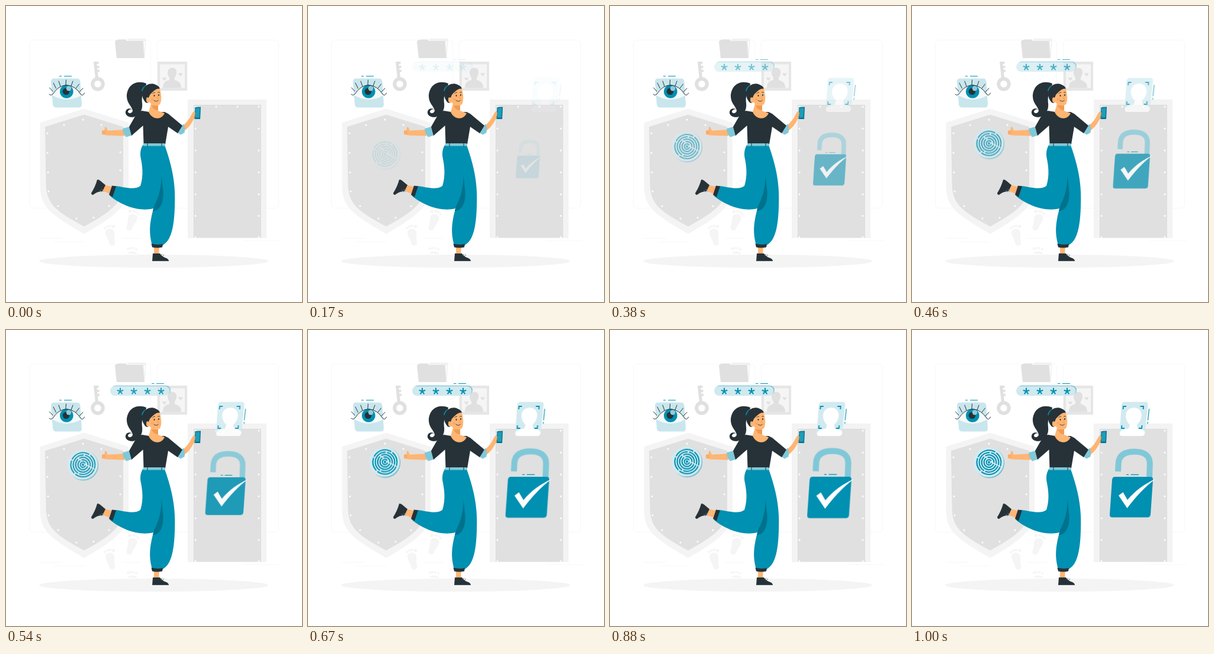
An HTML page without scripts for the animation above (1040 ms loop, 500 px wide and 500 px high).

```html
<!DOCTYPE html>
<html lang="en">
<head>
<meta charset="utf-8">
<title>Secure sign-in</title>
<style>
  html, body { margin: 0; width: 100%; height: 100%; overflow: hidden; background: #fff; }
  svg { display: block; width: 100%; height: 100%; }
  .line { fill: none; stroke: #263238; stroke-linecap: round; stroke-linejoin: round; }
  .tick { fill: none; stroke: #0090b1; stroke-width: 1.2; stroke-linecap: round; }
  .rivet { fill: none; stroke: #fff; stroke-width: 3; stroke-linecap: round; }
  .show { --from: none; animation: show 1040ms infinite cubic-bezier(.36, -.01, .5, 1.38); }
  .left { --from: translateX(30px); }
  .up { --from: translateY(30px); }
  .zoom { --from: scale(.5); transform-origin: 372.5px 258.5px; }
  @keyframes show {
    0% { opacity: 0; transform: var(--from) }
    91.4%, 100% { opacity: 1; transform: none }
  }
</style>
</head>
<body>
<svg viewBox="0 0 500 500">
  <defs>
    <path id="star" d="M0 0V-5.700M0 0 5.200-1.700M0 0-5.200-1.700M0 0 3.300 4.600M0 0-3.300 4.600" fill="none" stroke="#0090b1" stroke-width="2.100"/>
    <path id="heart" d="M0 3C-5-1-3-3-1.5-2.5L0-1 1.5-2.5C3-3 5-1 0 3Z" fill="#e0e0e0"/>
    <g id="foot" fill="#f5f5f5">
      <path d="M-9-6C-9-13 5-14 6-6 7 0 5 4 7 10 9 18-1 19-3 12-4 5-9 1-9-6Z"/>
      <circle cx="-10" cy="-13" r="2"/><circle cx="-6" cy="-15.5" r="2"/>
      <circle cx="-1.500" cy="-16.500" r="2.200"/><circle cx="4.500" cy="-15.500" r="2.800"/>
    </g>
  </defs>

  <!-- room -->
  <g fill="none" stroke="#f7f7f7">
    <rect x="39.500" y="57.500" width="205" height="284" rx="6"/>
    <rect x="255.500" y="57.500" width="205" height="284" rx="6"/>
    <path d="M57 392.500H95M82 398.500H131M402 396.500H463M195 392.500H228"/>
  </g>
  <ellipse cx="249.500" cy="431" rx="193.500" ry="11" fill="#f4f4f4"/>

  <path d="M205 55H236L233 88H210Z" fill="#f2f2f2"/>
  <path d="M232 59 236 58 233.500 88Z" fill="#fff" stroke="#ebebeb"/>
  <path d="M184 60Q186 56.500 191 56.500H202L204 59H231L233.500 88H187Z" fill="#e0e0e0"/>

  <g fill="none" stroke="#e0e0e0">
    <circle cx="155" cy="131.800" r="8.800" stroke-width="6"/>
    <path d="M150.500 94 153.500 122" stroke-width="5"/>
    <path d="M151 96.300 156.500 95.700M151.500 103.300 157.500 102.700M152 110 158 109.400" stroke-width="3.800"/>
  </g>

  <path d="M256 94H306V143H256Z" fill="#e6e6e6"/>
  <path d="M260 98.500H302V138.500H260Z" fill="#f5f5f5"/>
  <path d="M265 138.500C265 129 269 127 276 125V121C270 112 274 104.500 281 104.500S291 112 285 121V125C292 127 296 130 296 138.500Z" fill="#e0e0e0"/>
  <use href="#heart" x="267.500" y="123"/><use href="#heart" x="295" y="115.500"/>

  <path d="M57.500 197 132 173.500 207 197V304C207 335 190 352 132 385 75 352 58 340 57.500 304Z" fill="#f4f4f4"/>
  <path d="M66 204 132 183.500 198 204V300C198 329 184 344 132 372.500 84 346 68 335 67.500 300Z" fill="#e0e0e0"/>
  <path class="rivet" d="M70 215h0M70 248h0M71 281h0M72 313h0M88 338h0M119 359h0M148 357.500h0M174 338h0M192 313h0M193 277.500h0M193 247h0M193 215h0M130 192h0M161 201h0M98 201h0"/>

  <path d="M307 158H440V392H307Z" fill="#f3f3f3"/>
  <path d="M317 167H431V391.500H317Z" fill="#e0e0e0"/>
  <path d="M317.500 391V167.500H431" fill="none" stroke="#d8d8d8" stroke-width=".8"/>
  <path class="rivet" d="M320 207h0M320 244h0M320 281h0M320 318h0M320 354.500h0M320 390.500h0M427 207h0M427 244h0M427 281h0M427 318h0M427 354.500h0M427 390.500h0M320 170h0M355 170h0M391 170h0M427 170h0"/>

  <use href="#foot" x="177" y="388"/>
  <use href="#foot" transform="translate(212 363) scale(-1 1) rotate(-7)"/>
  <path d="M205 418C208 413 220 414 222 419Z" fill="#f5f5f5"/>
  <path d="M206 410h0M210 409h0M215 409h0M220 411h0" fill="none" stroke="#f5f5f5" stroke-width="4" stroke-linecap="round"/>

  <!-- eye -->
  <path d="M81 122.500H120Q125 122.500 125.500 128L128 166Q128 171.500 123 171.500H85Q79.500 171.500 79 166L76 128Q76 122.500 81 122.500Z" fill="#c9e6ed"/>
  <path d="M77 150Q86 134.500 102 134 118 135 127 151 115 158 102 158 87 157 77 150Z" fill="#f4fafb"/>
  <circle cx="102.300" cy="144.500" r="11.300" fill="#0090b1"/>
  <circle cx="101.500" cy="144.300" r="5.800" fill="#263238"/>
  <circle cx="106" cy="139.300" r="4.200" fill="#96c8d8"/>
  <path class="line" stroke-width="1" d="M73 149Q75 152 79 149 88 134.500 102 133.500 117 134.500 126 149 130 153 132.500 147M79 144 73.500 138M84.500 139 80 130M92 135.500 89 127M101 133.500 101.500 125M110 135 113 127M118 139 123.500 132M124 145 130 139"/>
  <path class="tick" d="M90.500 118.500h3M98.500 118.500h12"/>

  <!-- password -->
  <g class="show">
    <rect x="177.500" y="93.700" width="100.500" height="16" rx="8" fill="#7fc4d6"/>
    <rect x="176" y="95" width="100.500" height="16" rx="8" fill="#cfe9ef"/>
    <use href="#star" x="193" y="103.500"/><use href="#star" x="216" y="103.500"/>
    <use href="#star" x="239" y="103.500"/><use href="#star" x="262" y="103.500"/>
    <path class="tick" d="M246.500 90.500h3.500M254.500 90.500h12"/>
  </g>

  <!-- fingerprint -->
  <g class="show up">
    <ellipse cx="130.700" cy="224.500" rx="25.500" ry="25.800" fill="#72bccf"/>
    <ellipse cx="129.200" cy="223.300" rx="25.800" ry="25.300" fill="#d2eaf0"/>
    <g fill="none" stroke="#0090b1" stroke-width="2.100" stroke-linecap="round" transform="rotate(25 130 223.500)">
      <circle cx="130" cy="223.500" r="1"/>
      <circle cx="130" cy="223.500" r="4.400" stroke-dasharray="22 5.600"/>
      <circle cx="130" cy="223.500" r="8.400" stroke-dasharray="30 4 14.800 4"/>
      <circle cx="130" cy="223.500" r="12.400" stroke-dasharray="43 4 26.900 4"/>
      <circle cx="130" cy="223.500" r="16.400" stroke-dasharray="24 4 42 4 25 4"/>
      <circle cx="130" cy="223.500" r="20.400" stroke-dasharray="36 4 21 4 32 4 23.200 4"/>
    </g>
  </g>

  <!-- face scan -->
  <g class="show left">
    <path d="M359 121.500H394Q399 121.500 398.500 127L393.500 174Q393 179 388 179H355Q350 179 350.500 174L354 127Q354.500 121.500 359 121.500Z" fill="#d1eaf0"/>
    <path d="M351 173Q353 168 366 166.500L368 160C358 151 358 132 375 131 391 132 391 150 380 160L381 166.500Q393 168 393.500 173 393 179 388 179H355Q350 179 351 173Z" fill="#fff"/>
    <path d="M356.500 134 357 129H362M385.500 129H391L390.500 134M354.500 161 354 166H359M383 166H388L388.500 161" fill="none" stroke="#0090b1" stroke-width="1.800"/>
    <path class="tick" d="M400.500 133.500 398.500 152M398.200 155.500 398 158"/>
  </g>

  <!-- padlock -->
  <g class="show zoom">
    <path d="M348 239 348.800 224C350 211 360 205.500 376 205.500 392 205.500 402 212 401.800 226L401 249" fill="none" stroke="#80c8d8" stroke-width="10"/>
    <path d="M343 248H402.500Q407.500 248 407 253L403 311.500Q402.500 316.500 397.500 316.500H338.500Q333.500 316.500 334 311.500L338 253Q338.500 248 343 248Z" fill="#0090b1"/>
    <path d="M349 279.500 356.500 274 364 287C377 271 393 260 411.500 251.500 392 266 377 283 363.500 301Z" fill="#fff"/>
    <path class="tick" d="M362.500 244.300h3M370 244.300h12.500"/>
  </g>

  <!-- woman -->
  <path d="M237 131C226 126 207 128 204 150 203 164 213 169 214 177 213 182 207 182 206 179 206 176 209 174 213 174.500 207 171 201 175 202 181 203 187 213 190 219 186 228 181 231 174 230 164 229 156 230 148 235 143Z" fill="#263238"/>
  <path d="M229 143Q231 136 236 134L238 138Q233 140 232 146Z" fill="#0090b1"/>

  <path d="M200 209 172 210.500 169 204Q166 204 167 209L162 210.500V217L170 218.500 200 219.500Z" fill="#ffb573"/>
  <path d="M162 212.500H168M162.500 215H168" stroke="#ef9b53" stroke-width=".8"/>
  <path d="M300 201Q309 193 313 184L316 179Q320 176 322 181V188L317 191Q311 204 301 211Z" fill="#ffb573"/>
  <path d="M319.500 171 329 170.500 328 191 318.500 191Z" fill="#00728d"/>
  <path d="M320.500 172.500 327.500 172 326.700 188.500 319.700 188.500Z" fill="#1f9cba"/>
  <path d="M315 182 320 181M315 185 319.500 184" stroke="#ffb573" stroke-width="2"/>

  <path d="M197 207 210 203.500 214 218 203 221.500Q197 215 197 207Z" fill="#80c8d8"/>
  <path d="M288 213 300 199Q303 205 301.500 214L295 217.500Z" fill="#80c8d8"/>
  <path d="M230 177 242 179H268L274 182 298 202 290 215 274 204 269 233.500H232.500L231.500 202 212 219 208 204 220 183Q224 177 230 177Z" fill="#263238"/>
  <path d="M245 165 241 179C247 193 263 193 268 181L257 177V167Z" fill="#ffb573"/>
  <path d="M246 168Q250 177 257 176V168Z" fill="#ef9b53"/>

  <path d="M237 145Q242 137 255 139L260 140C262 148 264 159 260 166 255 170 247 168 243 163L238 161Q235 154 237 145Z" fill="#ffb573"/>
  <path d="M235 162C230 156 228 147 232 140 236 132 246 129 253 133 257 135 260 137 259.500 140 253 138 246 147 243 150L241 155Q237 153 237 157 238 161 241 163 237 165 235 162Z" fill="#263238"/>
  <ellipse cx="240" cy="159" rx="3" ry="4" fill="#ffb573"/>
  <ellipse cx="250.500" cy="151.500" rx="1" ry="1.400" fill="#263238"/>
  <ellipse cx="258" cy="150.500" rx="1" ry="1.400" fill="#263238"/>
  <path class="line" stroke-width=".9" d="M247.500 148Q249 145.500 251.500 146M256.500 146Q258 145 259.500 146M250 159.500Q255 163 257.500 159"/>
  <path d="M255 150.500 257.500 156H254.500" fill="none" stroke="#ef9b53" stroke-width=".9"/>
  <circle cx="247" cy="157.500" r="2.300" fill="#f59a62" opacity=".5"/>

  <path d="M165 302 178 305 175 317 162 312Z" fill="#ffb573"/>
  <path d="M154 293.500Q156 292.500 159 295L168 302.500 163 313Q154 313 147 319 144 319 144 316 151 305 154 293.500Z" fill="#263238"/>
  <path d="M158.500 311 162 315M162 309.500 165 314" stroke="#7fa9bd" stroke-width=".8"/>

  <path d="M250 406H259L258 420H250Z" fill="#ffb573"/>
  <path d="M248 418 260 418Q264 424 271 426 275 428 275 431H247Z" fill="#263238"/>
  <path d="M247 430.500H275M260 422 264 419M263 424 267 420" fill="none" stroke="#455a64" stroke-width=".8"/>

  <path d="M231 235H268C281 272 287 300 285 340 284 372 279 398 264 404H247C240 380 244 362 249 342 225 348 195 337 176 321L183 304C199 305 216 312 227 304 233 286 230 268 227.500 256 226 247 228 240 231 235Z" fill="#0090b1"/>
  <path d="M262.500 286C263 307 257 325 251 336L248 346C260 347 268 330 265 309Z" fill="#00728d"/>
  <path d="M232 232H268L269 236.500H231.500Z" fill="#80c8d8"/>
  <path d="M239 231.500V237M263 231.500V237" stroke="#263238" stroke-width="1"/>
  <path d="M179 303.500 186 304.500 180 322.500 174 319Z" fill="#263238"/>
  <path d="M245.500 401.500Q255 404 265 402L264 407.500Q255 409.500 247 407.500Z" fill="#263238"/>
</svg>
</body>
</html>
```
